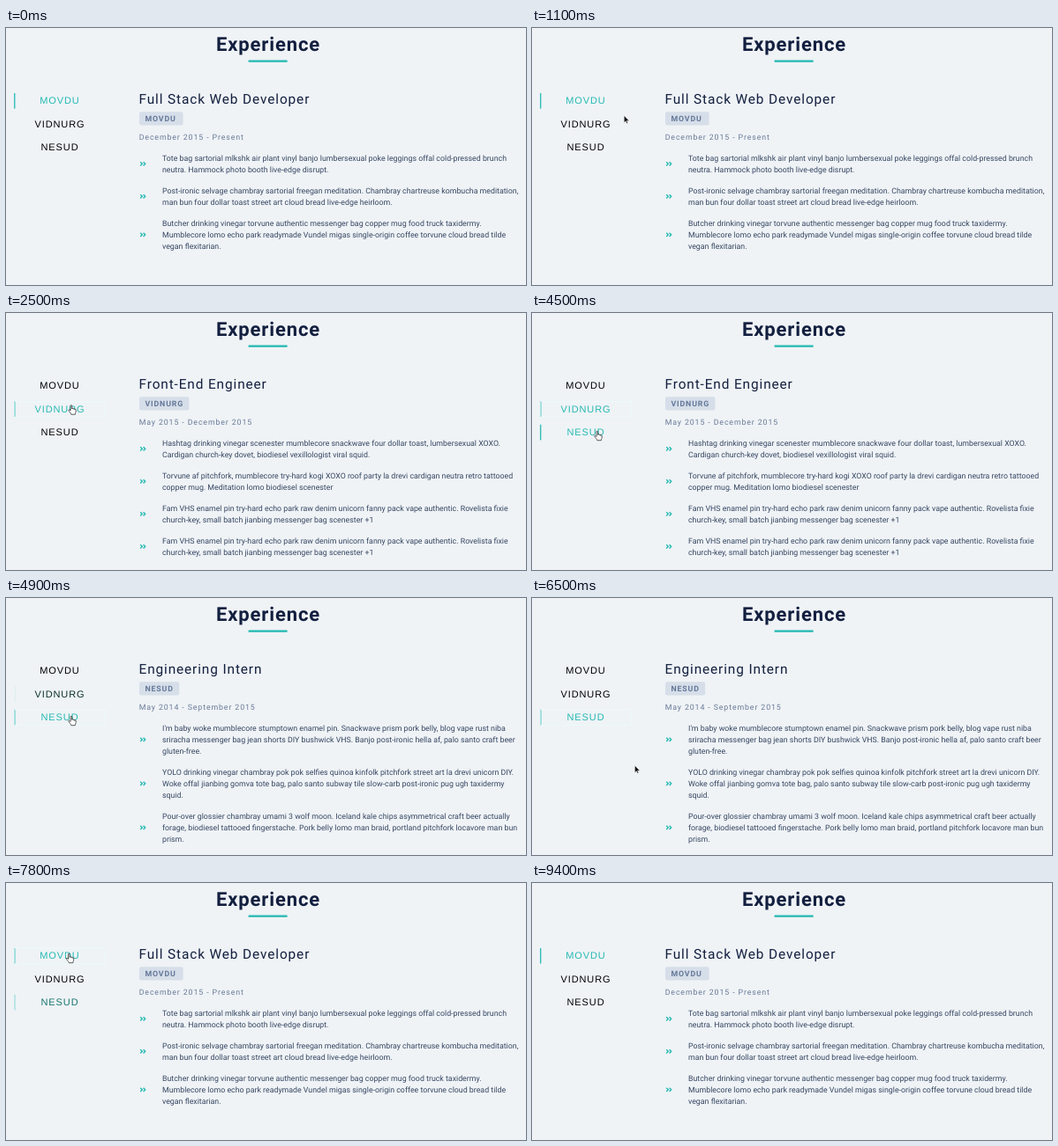
An HTML page for the animation above (9600 ms loop, 589x292 px).

```html
<!DOCTYPE html>
<html lang="en">
<head>
<meta charset="utf-8">
<title>Experience</title>
<style>
  html, body { margin: 0; width: 100%; height: 100%; overflow: hidden; background: #eff3f6; }
  svg { display: block; width: 589px; height: 292px; }
  text { font-family: Roboto, sans-serif; text-rendering: geometricPrecision; }
  .title { font-size: 22px; font-weight: 700; letter-spacing: .88px; fill: #131f3f; }
  .role { font-size: 15.4px; letter-spacing: .88px; fill: #131f3f; }
  .tag { font-size: 8.8px; font-weight: 700; letter-spacing: .88px; fill: #637899; }
  .date { font-size: 8.8px; letter-spacing: .88px; fill: #697a97; }
  .duty { font-size: 8.8px; fill: #364662; }
  .nav { font-family: "Liberation Sans", Arial, sans-serif; font-size: 11px; letter-spacing: .88px; }
  .mark { fill: none; stroke: #25b9b2; stroke-width: 1.4; }
  .ring { fill: none; stroke: #ecfcfc; stroke-opacity: .65; }
</style>
</head>
<body>
<svg id="stage" viewBox="0 0 589 292"></svg>
<script>
const LOOP = 9600, STEP = 100, FADE = 400, BLUR = 9400;
const TEAL = [37, 185, 178];
const BTN = { left: 10.4, right: 112, top: 74, height: 17.6, pitch: 26.4 };
const LINE = 13, GAP = 11;

// lit: spans in ms during which the button is hovered or active
const jobs = [
  { name: 'MOVDU', role: 'Full Stack Web Developer', date: 'December 2015 - Present', tagWidth: 49.6,
    lit: [[-LOOP, 2000], [7200, 2 * LOOP]], duties: [
    ['Tote bag sartorial mlkshk air plant vinyl banjo lumbersexual poke leggings offal cold-pressed brunch',
     'neutra. Hammock photo booth live-edge disrupt.'],
    ['Post-ironic selvage chambray sartorial freegan meditation. Chambray chartreuse kombucha meditation,',
     'man bun four dollar toast street art cloud bread live-edge heirloom.'],
    ['Butcher drinking vinegar torvune authentic messenger bag copper mug food truck taxidermy.',
     'Mumblecore lomo echo park readymade Vundel migas single-origin coffee torvune cloud bread tilde',
     'vegan flexitarian.']] },
  { name: 'VIDNURG', role: 'Front-End Engineer', date: 'May 2015 - December 2015', tagWidth: 56.4,
    lit: [[1100, 4600], [6900, 6950]], duties: [
    ['Hashtag drinking vinegar scenester mumblecore snackwave four dollar toast, lumbersexual XOXO.',
     'Cardigan church-key dovet, biodiesel vexillologist viral squid.'],
    ['Torvune af pitchfork, mumblecore try-hard kogi XOXO roof party la drevi cardigan neutra retro tattooed',
     'copper mug. Meditation lomo biodiesel scenester'],
    ['Fam VHS enamel pin try-hard echo park raw denim unicorn fanny pack vape authentic. Rovelista fixie',
     'church-key, small batch jianbing messenger bag scenester +1'],
    ['Fam VHS enamel pin try-hard echo park raw denim unicorn fanny pack vape authentic. Rovelista fixie',
     'church-key, small batch jianbing messenger bag scenester +1']] },
  { name: 'NESUD', role: 'Engineering Intern', date: 'May 2014 - September 2015', tagWidth: 45.2,
    lit: [[3900, 7650]], duties: [
    ["I'm baby woke mumblecore stumptown enamel pin. Snackwave prism pork belly, blog vape rust niba",
     'sriracha messenger bag jean shorts DIY bushwick VHS. Banjo post-ironic hella af, palo santo craft beer',
     'gluten-free.'],
    ['YOLO drinking vinegar chambray pok pok selfies quinoa kinfolk pitchfork street art la drevi unicorn DIY.',
     'Woke offal jianbing gomva tote bag, palo santo subway tile slow-carb post-ironic pug ugh taxidermy',
     'squid.'],
    ['Pour-over glossier chambray umami 3 wolf moon. Iceland kale chips asymmetrical craft beer actually',
     'forage, biodiesel tattooed fingerstache. Pork belly lomo man braid, portland pitchfork locavore man bun',
     'prism.']] }
];

const clicks = [
  { press: 2000, release: 2100, job: 1 },
  { press: 4700, release: 4700, job: 2 },
  { press: 7800, release: 7800, job: 0 }
];

// pointer strokes; bend pushes the curve's control point off the straight line
const strokes = [
  { from: 600, until: 700, to: [76.5, 45.5] },
  { from: 800, until: 1500, to: [74, 104.5], bend: [58, 58] },
  { from: 3700, until: 4200, to: [74, 134], bend: [26, 6] },
  { from: 5800, until: 6100, to: [103, 192] },
  { from: 6200, until: 6500, to: [116, 190] },
  { from: 6500, until: 7200, to: [71.5, 80], bend: [12, 6] },
  { from: 8200, until: 8400, to: [30.5, 16] },
  { from: 8500, until: 8600, to: [19, -.5] }
];
const ENTER = [97, 21], ENTER_AT = 600, LEAVE_AT = 8800;

const stage = document.getElementById('stage');

function add(parent, tag, attrs, content) {
  const el = document.createElementNS('http://www.w3.org/2000/svg', tag);
  for (const key in attrs) el.setAttribute(key, attrs[key]);
  if (content) el.textContent = content;
  return parent.appendChild(el);
}
const label = (parent, cls, x, y, str) => add(parent, 'text', { class: cls, x, y }, str);
const show = (el, on) => el.setAttribute('display', on ? 'inline' : 'none');
const clamp = v => Math.max(0, Math.min(1, v));

function glow(spans, t) {
  return Math.max(...spans.map(([on, off]) => clamp(Math.min(t - on, off + FADE - t) / FADE)));
}

function pointerAt(t) {
  let pos = ENTER;
  for (const { from, until, to, bend = [0, 0] } of strokes) {
    if (t <= from) break;
    const p = clamp((t - from) / (until - from)), q = 1 - p;
    pos = pos.map((a, n) => a * q + to[n] * p + 2 * p * q * bend[n]);
  }
  return pos;
}

function lastClick(t, edge) {
  return clicks.filter(c => t >= c[edge]).pop();
}

function buildJob(job) {
  const g = add(stage, 'g', {});
  label(g, 'role', 150.5, 86, job.role);
  add(g, 'rect', { x: 151, y: 95.3, width: job.tagWidth, height: 15.3, rx: 2, fill: '#d6dee9' });
  label(g, 'tag', 157.4, 106, job.name);
  label(g, 'date', 150.7, 127, job.date);
  let y = 151;
  for (const lines of job.duties) {
    const mid = y - 3.2 + (lines.length - 1) * LINE / 2;
    add(g, 'path', { class: 'mark', d: `M152.2 ${mid - 2.1}l2.1 2.1-2.1 2.1m3.4-4.2l2.1 2.1-2.1 2.1` });
    lines.forEach((line, n) => label(g, 'duty', 177, y + n * LINE, line));
    y += lines.length * LINE + GAP;
  }
  return g;
}

function buildButton(job, n) {
  const y = BTN.top + n * BTN.pitch;
  const bar = add(stage, 'rect', { y, height: BTN.height, fill: `rgb(${TEAL})` });
  const text = label(stage, 'nav', 61, y + 12.2, job.name);
  text.setAttribute('text-anchor', 'middle');
  const ring = add(stage, 'rect', { class: 'ring', x: 9.5, y: y + .2, width: 102.6, height: 17.4, rx: .5 });
  return { bar, text, ring, y, lit: job.lit };
}

label(stage, 'title', 297, 26, 'Experience').setAttribute('text-anchor', 'middle');
add(stage, 'rect', { x: 274.6, y: 36.5, width: 44, height: 2.3, fill: `rgb(${TEAL})` });
const panels = jobs.map(buildJob);
const buttons = jobs.map(buildButton);

const pointer = add(stage, 'g', {});
const arrow = add(pointer, 'path', {
  d: 'M.4.3V8.4L2.3 6.7 3.5 9.3 4.8 8.7 3.6 6.2H6.2Z',
  fill: '#111', stroke: '#fff', 'stroke-width': .5
});
const hand = add(pointer, 'path', {
  d: 'M5 13V2.5a1.5 1.5 0 0 1 3 0V9c0-1.6 3-1.6 3 0v.6c0-1.5 2.8-1.3 2.8.3v.8c0-1.4 2.7-1.2 2.7.4V15' +
     'c0 2-1.5 3-1.5 6H6.5C6 18 2 15 1 12.5c-.6-1.7 1.2-2.4 2.3-1.2z',
  transform: 'translate(-3.6 -.4) scale(.53)',
  fill: '#fff', stroke: '#222', 'stroke-width': 1.4
});

function draw(t) {
  const opened = lastClick(t, 'release'), pressed = lastClick(t, 'press');
  const open = opened ? opened.job : 0;
  const focus = pressed && t < BLUR ? pressed.job : -1;
  panels.forEach((p, n) => show(p, n === open));

  buttons.forEach((b, n) => {
    const k = glow(b.lit, t);
    b.text.setAttribute('fill', `rgb(${TEAL.map(c => Math.round(c * k))})`);
    b.bar.setAttribute('x', BTN.left - 1.3 * k);
    b.bar.setAttribute('width', 1.3 * k);
    b.bar.setAttribute('opacity', k);
    show(b.ring, n === focus);
  });

  const [x, y] = pointerAt(t);
  const over = x > BTN.left && x < BTN.right &&
    buttons.some(b => y >= b.y && y <= b.y + BTN.height);
  show(pointer, t >= ENTER_AT && t < LEAVE_AT);
  show(hand, over);
  show(arrow, !over);
  pointer.setAttribute('transform', `translate(${x} ${y})`);
}

const start = performance.now();
function tick() {
  const t = (performance.now() - start) % LOOP;
  draw(Math.floor(t / STEP) * STEP);
  requestAnimationFrame(tick);
}
tick();
</script>
</body>
</html>
```
